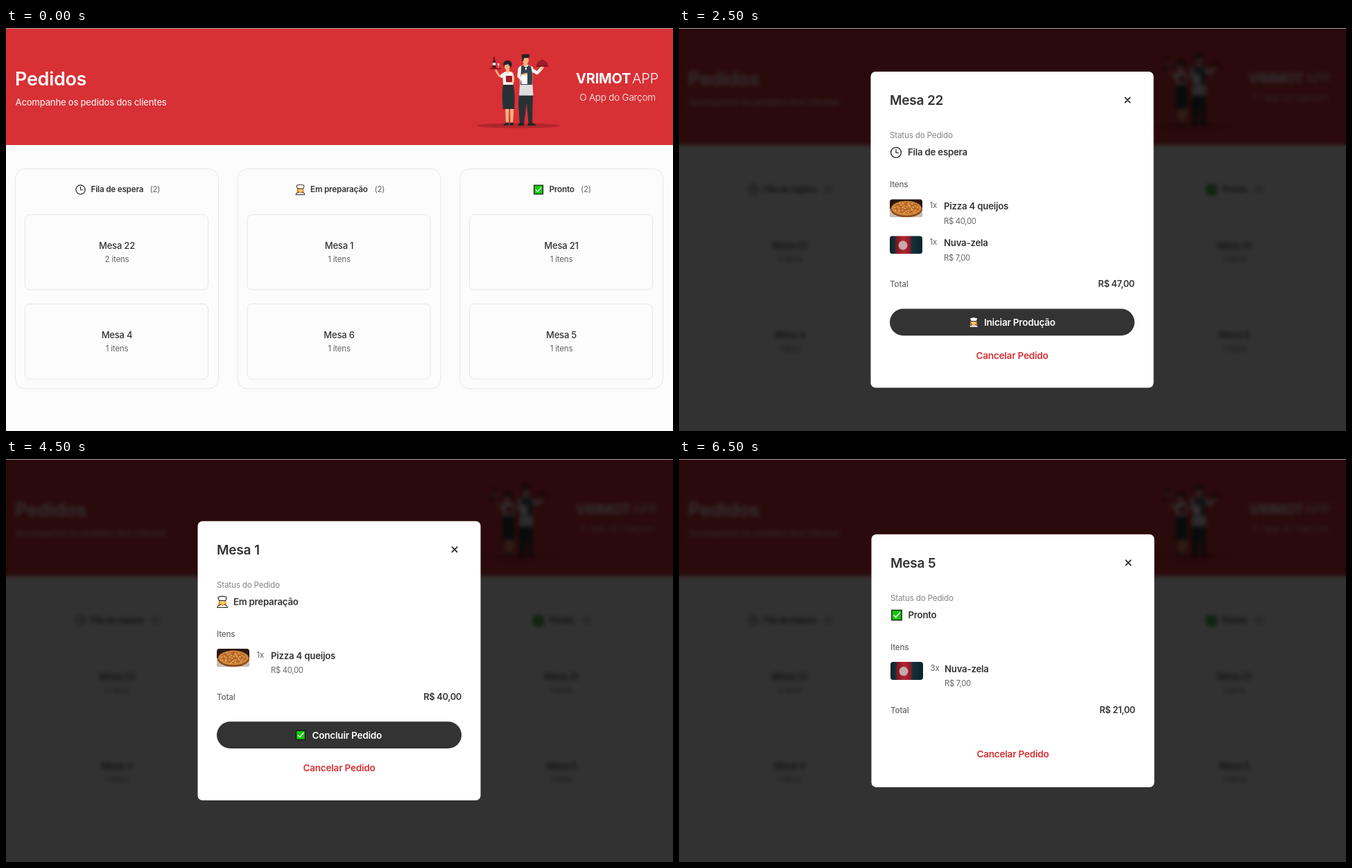
Recreate the animation shown at these times as an HTML page with a canvas. Size 962x582 px, loop 8.5 s.

```html
<!DOCTYPE html>
<html lang="pt-BR">
<head>
<meta charset="utf-8">
<title>Pedidos</title>
<style>
html, body { margin: 0; width: 100%; height: 100%; overflow: hidden; background: #fcfcfc; }
canvas { display: block; }
</style>
</head>
<body>
<canvas id="stage" width="962" height="582"></canvas>
<script>
const W = 962, H = 582, LOOP = 8500;
const RED = '#d73035', INK = '#333', GRAY = '#666', DARK = '#263136', SKIN = '#f8b27c';
const stage = document.getElementById('stage').getContext('2d');
let c = stage;

function layer() {
  const el = document.createElement('canvas');
  el.width = W;
  el.height = H;
  return el.getContext('2d');
}

// y is the middle of the capital letters
function text(str, x, y, size, weight, color, align = 'left', spacing = -0.2) {
  c.font = `${weight} ${size}px Inter, "Open Sans", sans-serif`;
  c.letterSpacing = spacing + 'px';
  c.textAlign = align;
  c.fillStyle = color;
  c.fillText(str, x, y + size * 0.36);
}

function box(x, y, w, h, r, fill, stroke) {
  c.beginPath();
  c.roundRect(x, y, w, h, r);
  if (fill) { c.fillStyle = fill; c.fill(); }
  if (stroke) { c.strokeStyle = stroke; c.lineWidth = 1; c.stroke(); }
}

function oval(x, y, rx, ry, fill) {
  c.beginPath();
  c.ellipse(x, y, rx, ry, 0, 0, Math.PI * 2);
  c.fillStyle = fill;
  c.fill();
}

function shape(d, fill) {
  c.fillStyle = fill;
  c.fill(new Path2D(d));
}

function line(d, color, width) {
  c.strokeStyle = color;
  c.lineWidth = width;
  c.lineCap = c.lineJoin = 'round';
  c.stroke(new Path2D(d));
}

function at(x, y, draw) {
  c.save();
  c.translate(x, y);
  draw();
  c.restore();
}

const icons = {
  clock() {
    oval(0, 0, 7.2, 7.2, '#222');
    oval(0, 0, 6, 6, '#fff');
    line('M0 -4V.3H3', '#222', 1.1);
  },
  cook() {
    shape('M-4.5 -2H4.5L5 3L6.5 7H-6.5L-5 3Z', '#e08a1e');
    oval(0.3, 0.3, 3.2, 3.6, '#ffc86b');
    shape('M-6.5 7.2Q-6 3.8 -2 3.6L.5 5.5L2.5 3.6Q6 3.8 6.5 7.2Z', '#fff');
    line('M-6.5 7.2Q-6 3.8 -2 3.6M2.5 3.6Q6 3.8 6.5 7.2H-6.5', '#222', 1);
    const hat = 'M-4 -1.8L-5.5 -5Q-5.6 -7.2 -3 -6.7Q0 -8.2 3 -6.7Q5.8 -7.2 5.5 -5L4.2 -1.8Z';
    shape(hat, '#fff');
    line(hat, '#222', 1);
  },
  check() {
    box(-7, -7, 14, 14, 0, '#111');
    box(-5.9, -5.9, 11.8, 11.8, 0, '#16c60c');
    line('M-3.6 .2L-1.2 2.8L3.8 -3', '#fff', 1.4);
  }
};

function waiters() {
  oval(738.5, 141, 60, 3.6, '#b0262b');

  // waitress
  shape('M720 114H725.5L725 138H721ZM727 114H732.5L731 138H727.5Z', SKIN);
  shape('M717 140.5L721 136.5H725V140.5ZM726 140.5L727.5 136.5H731.5V140.5Z', '#1f2428');
  shape('M717 81H731.5Q735 97 733 117H717Q714.500 98 717 81Z', DARK);
  line('M717.5 69L711.500 69.5L706.500 61', SKIN, 2.6);
  shape('M713.5 67L719 63.500Q726 61 731 64.500L733 72L731.500 82H717L716.500 72L713 71.500Z', '#f6f2f0');
  line('M732 70L732 77L724 78', SKIN, 2.3);
  box(721, 69, 9, 9, 1, '#9c1c25');
  shape('M721.500 57H726V63L723.500 65L721 63Z', SKIN);
  oval(723.500, 52.500, 6.3, 5.7, '#232528');
  oval(722.800, 55.800, 3.900, 4.800, SKIN);
  shape('M718.500 53Q721 49 724 50Q728 51 728 56Q725 54 724 52Q721 54 718.500 53Z', '#232528');
  line('M699 58.500H713', '#8e171f', 1.800);
  shape('M701.500 57.500V48.500L703 46.500V42H705V46.500L706.500 48.500V57.500Z', '#531018');
  box(701.700, 50, 4.600, 4, 0, '#efe3dc');
  shape('M708.500 51H712L711.500 54.500H709ZM709.900 54H710.700V58H709.900Z', '#e8b0ad');

  // waiter
  shape('M740 94H760L759.500 112L759 138H753.500L751 108L747 138H741L739 110Z', DARK);
  shape('M737.500 141L741 137H747V141ZM752 141L753.500 137H759L764 139.800V141Z', '#1f2428');
  line('M758 60L766 65L773 57.500', '#f6f2f0', 4.500);
  line('M772 59L774.500 56.500', SKIN, 2.500);
  shape('M740 56L746 53H753L760 56.500L759 84H741.500Z', '#f6f2f0');
  shape('M743 55L746.500 53.500L750 61L753 53.500L757 55.500L759.500 67L758.500 84H742Z', '#34424a');
  shape('M747 54L750 61L753 54Z', '#fff');
  shape('M747.500 55.500L752.500 58.500V55.500L747.500 58.500Z', '#1f2428');
  shape('M741 82H759.500L760.500 97.500H740Z', '#dedddd');
  line('M740.500 59L739.500 70L745 75', '#f6f2f0', 4.200);
  shape('M743 67H752V81H743.500Z', '#fff');
  line('M746 67L751 66', SKIN, 2.500);
  shape('M746.500 48H752V54L749.500 56L746.500 54Z', SKIN);
  oval(749.500, 46.500, 4.300, 5.600, SKIN);
  shape('M743.500 38.500Q749 37.500 755 38L754.500 43L747 43.500L746 48H744.700Z', '#232528');
  shape('M765 54.500Q766 47 773.500 46.800Q781 47 781.500 54.500Z', '#9c1c25');
  oval(773.500, 46.600, 1.200, 1, '#6f131b');
  line('M765 55H781.500', '#711019', 1.500);
}

function column(x, icon, iconX, title, titleX, countX, cards) {
  box(x, 203.5, 293, 317.5, 14, null, '#e7e7e7');
  at(iconX, 233.5, icons[icon]);
  text(title, titleX, 233, 11.7, 600, INK);
  text('(2)', countX, 233, 11.5, 400, GRAY);
  cards.forEach(([name, count], i) => {
    const y = 269 + 129 * i;
    box(x + 14, y + 0.5, 264, 108.5, 7, null, '#e7e7e7');
    text(name, x + 146.5, y + 45, 13, 500, INK, 'center');
    text(count + ' itens', x + 146.5, y + 65, 11.5, 400, GRAY, 'center');
  });
}

function board() {
  c.fillStyle = '#fcfcfc';
  c.fillRect(0, 0, W, H);
  c.fillStyle = RED;
  c.fillRect(0, 0, W, 169);
  text('Pedidos', 13, 73.5, 27, 600, '#fff', 'left', -0.3);
  text('Acompanhe os pedidos dos clientes', 13.5, 107, 13, 500, 'rgba(255,255,255,.86)');
  waiters();
  text('VRIMOT', 822, 73, 20, 700, '#fff');
  text('APP', 941, 73, 20, 300, '#fff', 'right');
  text('O App do Garçom', 882, 100.5, 13.5, 300, '#fff', 'center');
  column(13.5, 'clock', 107.5, 'Fila de espera', 122.5, 207.5, [['Mesa 22', 2], ['Mesa 4', 1]]);
  column(334, 'cook', 424.5, 'Em preparação', 439, 531.5, [['Mesa 1', 1], ['Mesa 6', 1]]);
  column(654.5, 'check', 768, 'Pronto', 783.5, 829, [['Mesa 21', 1], ['Mesa 5', 1]]);
}

function clipPhoto(x, y, draw) {
  at(x, y, () => {
    c.beginPath();
    c.roundRect(0, 0, 47, 26, 4);
    c.clip();
    draw();
  });
}

function pizzaPhoto() {
  box(0, 0, 47, 26, 0, '#2b1713');
  shape('M0 14L8 11H40L47 13V26H0Z', '#c9bdb4');
  oval(24, 14.500, 23, 11.500, '#8a4a1c');
  oval(24, 13, 21.500, 10.500, '#d28a3c');
  oval(24, 12.500, 18.500, 8.500, '#c0702b');
  for (let i = 0; i < 44; i++) {
    const a = i * 2.4, r = Math.sqrt(i / 44);
    oval(24 + Math.cos(a) * r * 18, 12.5 + Math.sin(a) * r * 8, 1.1, 0.8, i % 3 ? '#efc57c' : '#a2501c');
  }
}

function sodaPhoto() {
  const g = c.createLinearGradient(0, 0, 47, 0);
  [[0, '#0c2228'], [0.16, '#15303a'], [0.18, '#6e1722'], [0.42, '#b52532'],
   [0.62, '#8a1b28'], [0.68, '#15313a'], [1, '#0b242b']].forEach(s => g.addColorStop(...s));
  box(0, 0, 47, 26, 0, g);
  oval(19, 13.500, 6.500, 6.500, '#c9a7aa');
}

const PIZZA = { name: 'Pizza 4 queijos', price: 'R$ 40,00', photo: pizzaPhoto };
const SODA = { name: 'Nuva-zela', price: 'R$ 7,00', photo: sodaPhoto };

const modals = [
  { from: 2500, x: 276.5, top: 63, bottom: 519.5, title: 'Mesa 22',
    icon: 'clock', iconDx: 9, status: 'Fila de espera', statusDx: 26,
    items: [['1x', PIZZA], ['1x', SODA]], total: 'R$ 47,00',
    action: ['cook', 'Iniciar Produção', 440] },
  { from: 4500, x: 276.5, top: 89.8, bottom: 493, title: 'Mesa 1',
    icon: 'cook', iconDx: 8, status: 'Em preparação', statusDx: 24,
    items: [['1x', PIZZA]], total: 'R$ 40,00',
    action: ['check', 'Concluir Pedido', 441.5] },
  { from: 6500, x: 277.5, top: 108.8, bottom: 474, title: 'Mesa 5',
    icon: 'check', iconDx: 9, status: 'Pronto', statusDx: 25.5,
    items: [['3x', SODA]], total: 'R$ 21,00' }
];

function modal(m) {
  const l = m.x + 27.5, r = l + 353, mid = m.x + 204, t = m.top;
  box(m.x, t, 408, m.bottom - t, 7, '#fff');
  text(m.title, l, t + 41, 19, 600, INK);
  at(r - 10, t + 41, () => line('M-3.6 -3.6L3.6 3.6M3.6 -3.6L-3.6 3.6', '#222', 1.7));
  text('Status do Pedido', l, t + 91.5, 11.7, 400, '#858585');
  at(l + m.iconDx, t + 116.700, () => {
    c.scale(1.12, 1.12);
    icons[m.icon]();
  });
  text(m.status, l + m.statusDx, t + 116.500, 13.2, 600, INK);
  text('Itens', l, t + 162.500, 11.7, 500, GRAY);
  m.items.forEach(([count, item], i) => {
    const y = t + 184.3 + 53 * i;
    clipPhoto(l, y, item.photo);
    text(count, l + 57.5, y + 8.7, 11.5, 400, GRAY);
    text(item.name, l + 78, y + 9.7, 13.2, 600, INK);
    text(item.price, l + 78, y + 31.2, 11.3, 400, GRAY, 'left', -0.3);
  });
  let y = t + 200.5 + 53 * m.items.length;
  text('Total', l, y, 11.7, 500, GRAY);
  text(m.total, r, y + 0.3, 12.8, 600, INK, 'right', -0.3);
  if (m.action) {
    const [icon, label, x] = m.action;
    box(l, y + 36, 353, 38.7, 19.3, INK);
    at(425, y + 55.5, icons[icon]);
    text(label, x, y + 55.5, 13.5, 600, '#fff');
    y += 39.5;
  }
  text('Cancelar Pedido', mid, y + 63.7, 13.5, 600, RED, 'center');
}

const plain = layer(), dimmed = layer();
c = plain;
board();
dimmed.drawImage(plain.canvas, 0, 0);
dimmed.filter = 'blur(3px)';
dimmed.drawImage(plain.canvas, 0, 0);
dimmed.filter = 'none';
dimmed.fillStyle = 'rgba(0,0,0,.8)';
dimmed.fillRect(0, 0, W, H);
c = stage;

function render(now) {
  const t = now % LOOP;
  const open = modals.findLast(m => t >= m.from);
  c.drawImage((open ? dimmed : plain).canvas, 0, 0);
  if (open) modal(open);
  c.fillStyle = '#a6a3a8';
  c.fillRect(0, 0, W, 1);
}

const start = performance.now();
function tick() {
  render(performance.now() - start);
  requestAnimationFrame(tick);
}
tick();
</script>
</body>
</html>
```
